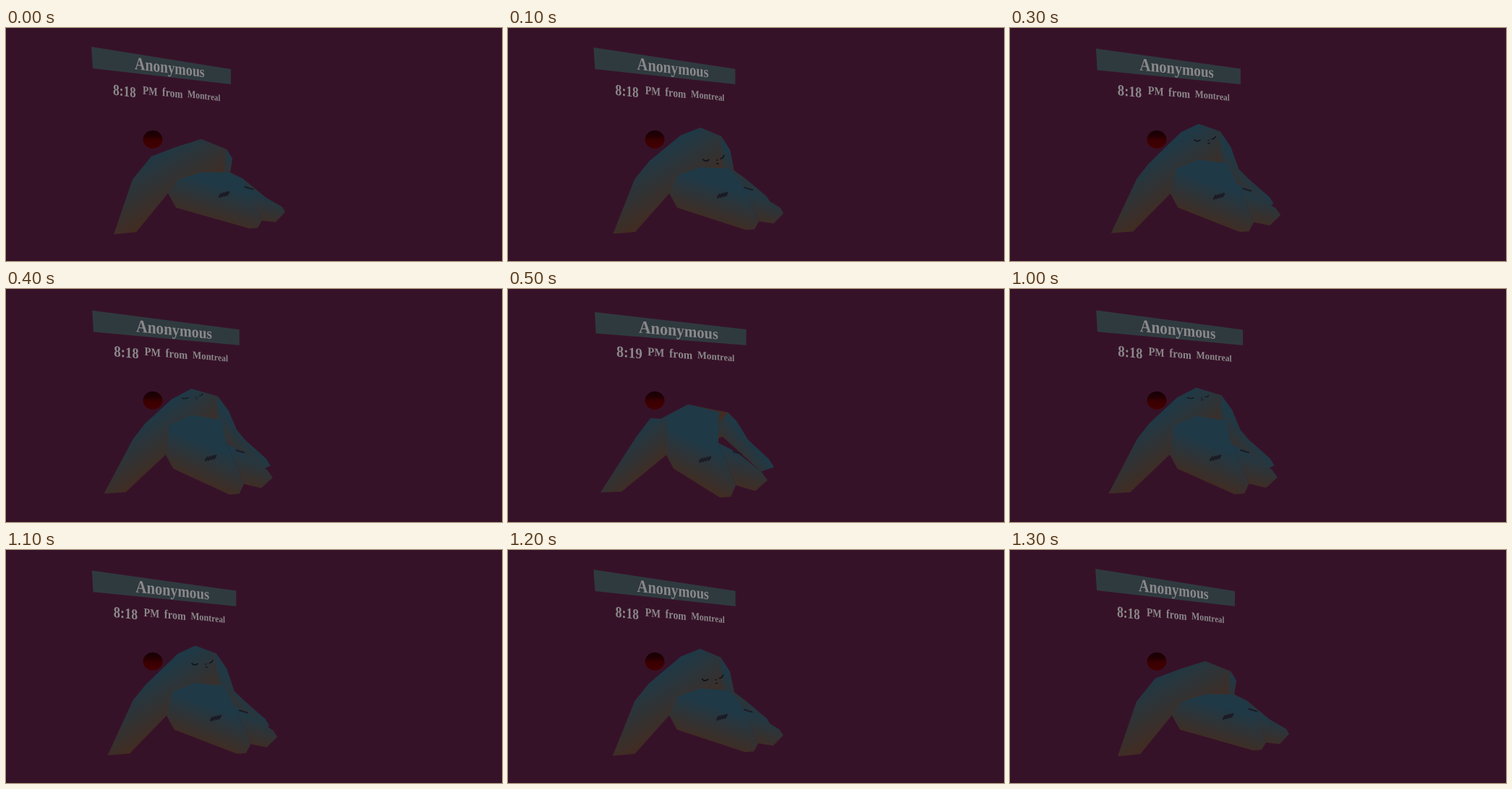
An HTML page with a canvas for the animation above (1700 ms loop, 686x323 px).

```html
<!DOCTYPE html>
<html lang="en">
<head>
<meta charset="utf-8">
<title>Stretching figure</title>
<style>
html, body { margin: 0; width: 100%; height: 100%; overflow: hidden; background: #361228; }
canvas { display: block; }
</style>
</head>
<body>
<canvas id="stage" width="686" height="323"></canvas>
<script>
const ctx = document.getElementById('stage').getContext('2d');
const BLUE = '#1f3946', BROWN = '#422c22', INK = '#1b1b25';
const LOOP = 1700, STEP = 100;

// turn swings the whole scene from 0 to 1, lift raises the head on the way.
let turn = 0, lift = 0;

const ramp = (t, from, to) => Math.min(1, Math.max(0, (t - from) / (to - from)));
const swing = (a, b) => a + (b - a) * turn;

// A point at rest, its shift over a full turn and its shift at full lift.
const at = (x, y, dx = 0, dy = 0, lx = 0, ly = 0) =>
  [x + dx * turn + lx * lift, y + dy * turn + ly * lift];

function turnAt(time) {
  const t = Math.floor(time / STEP) * STEP;
  const out = ramp(t, 0, 500);
  return out - .18 * Math.sin(Math.PI * out ** 2) - ramp(t, 800, 1300);
}

function shade([x0, y0], [x1, y1]) {
  const g = ctx.createLinearGradient(x0, y0, x1, y1);
  g.addColorStop(0, BLUE);
  g.addColorStop(1, BROWN);
  return g;
}

function polygon(fill, ...points) {
  ctx.beginPath();
  points.forEach(p => ctx.lineTo(...p));
  ctx.closePath();
  ctx.fillStyle = fill;
  ctx.fill();
}

function stroke(width, ...points) {
  ctx.lineWidth = width;
  ctx.beginPath();
  points.forEach(p => ctx.lineTo(...p));
  ctx.stroke();
}

// Text on a receding plane: letters shrink towards the right.
function write(text, [x, y], size0, size1) {
  ctx.save();
  ctx.transform(swing(.82, .93), swing(.095, .078), 0, 1, x, y);
  ctx.fillStyle = '#8a888a';
  let dx = 0;
  [...text].forEach((ch, i) => {
    const size = size0 + (size1 - size0) * i / (text.length - 1);
    ctx.font = `bold ${size}px "Liberation Serif", serif`;
    ctx.fillText(ch, dx, 0);
    dx += ctx.measureText(ch).width;
  });
  ctx.restore();
}

function drawSign() {
  polygon('#2f3a3f', at(118, 26, 2, 6), at(311, 57, 18.5, -1), at(311, 78, 18.5), at(120, 56, 1.5, 5.5));
  write('Anonymous', at(178, 57, 3, 3.5), 24.5, 21.5);
  write(turn > .7 ? '8:19' : '8:18', at(148, 92.5, 2, 1), 21.5, 20.5);
  write('PM', at(189, 91.5, 4, .5), 16.5, 16);
  write('from', at(216, 94, 7, .5), 17, 16);
  write('Montreal', at(251, 96, 11), 14.6, 12.7);
}

function drawBody() {
  const shoulder = at(201, 178, -4, 1, -7, 9), head = at(270, 154, -21, 6, 0, -24);
  const nape = at(235, 165, -24, 15, 12, -27), brow = at(305, 168, -1, 3, -14, -26);
  const cheek = at(313, 181, 3, 2, -9, -17), waist = at(310, 200, 14, -4, 0, -3);
  const armpit = at(224, 229, -5, 1), knee = at(328, 210, -37, 4), ankle = at(354, 267, -39, 5);

  // back, head and arm
  polygon(shade(at(190, 180, -5, 10), at(230, 250, -8, -14)),
    at(149, 286, -21, -4), at(175, 210, 1, -3), shoulder, nape, head, brow, cheek, waist,
    armpit, at(180, 283, -23, -2));
  // far leg
  polygon(shade(at(337, 205, -5, 4), at(309, 231, -6, 3)),
    brow, cheek, waist, at(328, 209, 4), at(357, 233, 4, 3), at(362, 241, 6, 6),
    at(350, 253), at(300, 212, -14, -17));
  // near leg
  polygon(shade(at(348, 228, -18), at(338, 270, -21, 6)),
    at(310, 205, -20, 8), at(349, 229, -33, -3), at(382, 248, -32, 5), at(386, 255, -27, 10),
    at(373, 269, -31, 11), ankle, knee);
  // belly and front leg
  polygon(shade(at(291, 217, -23, -2), at(277, 268, -33, -3)),
    armpit, at(238, 210, -18, -34), at(270, 200, -21, -40), at(308, 200, -16, -29),
    knee, ankle, at(348, 277, -40, 11), at(337, 278, -44, 11), at(235, 249, -6));
}

function drawBall() {
  const g = ctx.createLinearGradient(0, 142, 0, 167);
  g.addColorStop(0, '#150006');
  g.addColorStop(.3, '#220003');
  g.addColorStop(.55, '#3a0002');
  g.addColorStop(1, '#430001');
  ctx.beginPath();
  ctx.ellipse(203, 154.5, 13.5, 12.5, 0, 0, 7);
  ctx.fillStyle = g;
  ctx.fill();
}

function drawMarks() {
  ctx.strokeStyle = INK;
  ctx.lineCap = 'round';
  const [x, y] = at(296.5, 232, -30, 5.5), gap = swing(3.4, 4);
  for (let i = 0; i < 4; i++) {
    const mx = x + i * gap, my = y - i * .9;
    stroke(3, [mx - 1, my + 2], [mx + 1.2, my - 1.8]);
  }
  stroke(2, at(330.5, 220.2, -19, 5), at(336, 222, -19, 5), at(341.5, 223.6, -19, 5));
}

// The face rides up and over the head and flattens as it turns away.
function drawFace() {
  const open = Math.min(1, 1.4 - 1.4 * turn);
  if (turn <= .01 || open <= .01) return;
  ctx.save();
  ctx.translate(284 - 57 * turn, 151 + 180 * (turn - .6) ** 2);
  ctx.rotate(-.6 * ramp(turn, .6, .8));
  ctx.scale(1, open);
  ctx.strokeStyle = '#12121a';
  stroke(1.8, [-4, -1], [-2, 1], [1, 1.2], [4, -.5]);
  if (open > .4) {
    stroke(1.6, [20, -2], [23, -3], [25, -6.5]);
    stroke(1.8, [15, 0], [15.5, 0]);
    stroke(1.6, [15, 5], [17, 5]);
  }
  ctx.restore();
}

function draw(time) {
  turn = Math.max(0, turnAt(time % LOOP));
  lift = Math.sin(Math.PI * turn ** .8);
  ctx.fillStyle = '#361228';
  ctx.fillRect(0, 0, 686, 323);
  drawSign();
  drawBody();
  drawBall();
  drawMarks();
  drawFace();
}

const start = performance.now();
function tick() {
  draw(performance.now() - start);
  requestAnimationFrame(tick);
}
tick();
</script>
</body>
</html>
```
